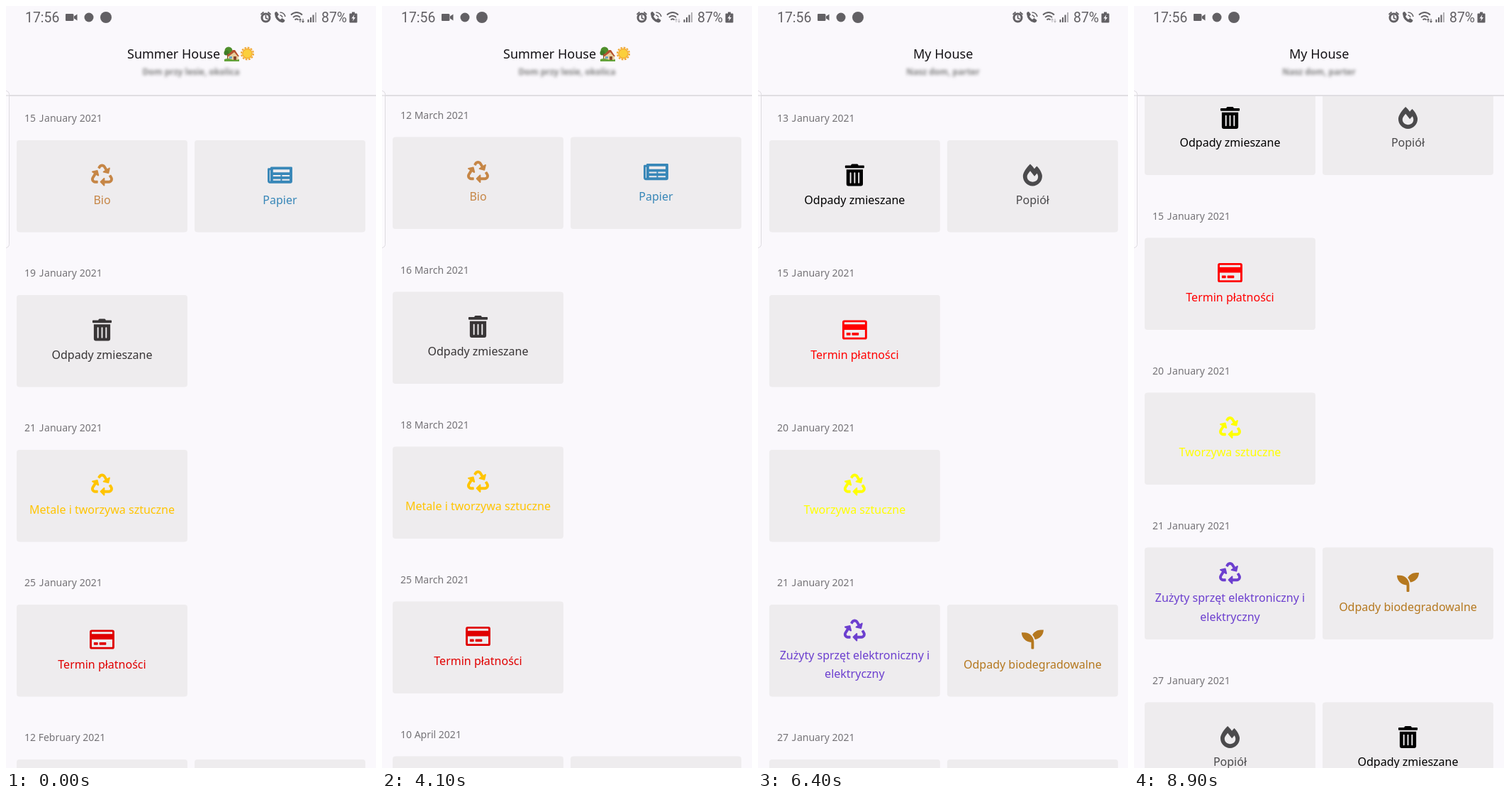
An HTML page that plays this animation: 522 by 1073 pixels, repeating every 9 s.

```html
<!DOCTYPE html>
<html lang="pl">
<head>
<meta charset="utf-8">
<title>Waste calendar</title>
<style>
html, body { margin: 0; width: 100%; height: 100%; overflow: hidden; background: #faf8fc; }
svg { display: block; width: 522px; height: 1073px; font-family: "Noto Sans", sans-serif; }
.date { font-size: 14px; fill: #757377; }
.date tspan { font-family: "Noto Sans Mono", monospace; }
.label { font-size: 16px; text-anchor: middle; }
.title { font-size: 18px; fill: #141215; }
.sub { font-size: 12px; font-weight: 700; fill: #808080; text-anchor: middle; filter: blur(2.3px); }
.status { font: 19.4px Roboto, sans-serif; }
</style>
</head>
<body>
<svg viewBox="0 0 522 1073">
  <g id="home"></g>
  <g id="other"></g>

  <rect width="522" height="125.5" fill="#faf8fc"/>
  <rect y="125" width="522" height="1" fill="#e3e1e5"/>
  <rect y="126" width="522" height="1" fill="#dddbdf"/>
  <rect x="-10" y="119.5" width="14.5" height="221" rx="5" fill="#fff" fill-opacity=".25" stroke="#dddbe0"/>

  <g id="homeTitle">
    <text class="title" x="171" y="73.5">Summer House</text>
    <text class="sub" x="261" y="97">Dom przy lesie, okolica</text>
    <g transform="translate(307 57)">
      <circle cx="7" cy="6" r="5.5" fill="#4f8f2c"/>
      <circle cx="4" cy="9" r="3.5" fill="#3f7d26"/>
      <path d="M6 10v9" stroke="#75502e" stroke-width="2"/>
      <path d="M6 12l8-6 7 7v7H6z" fill="#e9cf9d"/>
      <path d="M5 13l8-8h3l6 9h-2l-5-6-8 6z" fill="#b6522f"/>
      <path d="M14 14h4v6h-4z" fill="#8a4a2c"/>
      <path d="M8 14h4v3H8z" fill="#6fa8c9"/>
      <path d="M1 18q5-2 10 0t11 0v3H1z" fill="#64a33a"/>
    </g>
    <circle cx="340.5" cy="67" r="7.5" fill="#f5b13a"/>
    <circle cx="340.5" cy="67" r="8.500" fill="none" stroke="#f0a834" stroke-width="2" stroke-dasharray="2.7 1.75"/>
    <circle cx="340.5" cy="67" r="5.8" fill="#fbcf3c"/>
  </g>
  <g id="otherTitle">
    <text class="title" x="219" y="73.5">My House</text>
    <text class="sub" x="261" y="97">Nasz dom, parter</text>
  </g>

  <g fill="#626064">
    <text class="status" x="27" y="23">17:56</text>
    <text class="status" x="445" y="23">87%</text>
    <path d="M85 11h9q1.500 0 1.500 1.500v7q0 1.500-1.500 1.500h-9q-1 0-1-1v-8q0-1 1-1zM96 14.500l4.500-3v9l-4.500-3z"/>
    <circle cx="117" cy="16" r="6.500"/>
    <circle cx="141" cy="16" r="8"/>
    <path d="M485.500 10.500h2.500v-2h4v2h2.500q1 0 1 1v11q0 1-1 1h-9q-1 0-1-1v-11q0-1 1-1z"/>
    <path d="M491.500 12l-4 5.500h2.500l-1 4 4-5.500h-2.500z" fill="#faf8fc"/>
    <path d="M379 11q0-3 3-3l3 4-2 2.500q1.500 3 4 4.500l2.500-2 4 3q-.5 3-3.500 3.500-10-2-11-12.500z"/>
  </g>
  <g fill="none" stroke="#626064" stroke-width="2">
    <circle cx="366.500" cy="16.500" r="5.500" stroke-width="3"/>
    <path d="M366.500 13v4l3 1.500M359.500 12l4-3.500M373.500 12l-4-3.500" stroke-width="1.700"/>
    <path d="M386.500 9q6 0 7.500 6M386.500 13q2.500 0 3.500 3" stroke-width="1.500"/>
    <path d="M402 12.500q8-7 16 0M405 16q5-4.500 10 0M407.500 19.500q2.500-2.500 5 0" stroke-width="1.800"/>
    <path d="M426.500 23v-4M430 23v-7M433.500 23v-10.500"/>
    <path d="M437 23v-14" stroke="#b3b1b5"/>
    <path id="arrows" d="M415 23v-5m-1.500 2l1.500-2 1.500 2M419 18v5m-1.500-2l1.500 2 1.500-2" stroke-width="1.100"/>
  </g>
</svg>
<script>
const $ = id => document.getElementById(id);
const PITCH = 218, WIDTH = 522.5, LOOP = 9000, STEP = 100, ICON = 31 / 512;

// Icon: [width, path], drawn on a grid 512 units high
const recycle = [512,
  "M185 262c3 14-12 25-24 17l-41-25-51 81c-13 21 2 49 27 49h52q12 0 12 12v40q0 12-12 12H96c-75 0-121-83-81-147l51-81-41-25c-12-8-9-26 5-29l110-26c9-2 17 3 19 12z" +
  "M283 79l41 66-41 25c-12 8-9 26 5 30l110 25c9 2 17-3 19-12l26-110c3-14-12-25-24-17l-41 25-41-66c-38-60-125-60-163 0l-18 29c-4 6-2 13 4 17l34 21c6 4 13 2 17-4l18-29c13-20 42-19 54 0z" +
  "M497 301l-27-44c-4-6-11-7-17-4l-34 21c-6 4-7 11-4 17l28 44c13 21-2 49-27 49h-96v-48c0-14-17-21-27-11l-80 80c-6 6-6 16 0 22l80 80c10 10 27 3 27-11v-48h96c75 0 121-83 81-147z"];
const slot = x => `M${x} 208a16 16 0 0 1 32 0v224a16 16 0 0 1-32 0z`;
const trash = [448, "M32 464a48 48 0 0 0 48 48h288a48 48 0 0 0 48-48V128H32z" + [112, 208, 304].map(slot).join("") +
  "M432 32H312l-9-19q-7-13-21-13H167q-15 0-22 13l-9 19H16Q0 32 0 48v32q0 16 16 16h416q16 0 16-16V48q0-16-16-16z"];
const card = [576, "M528 32H48Q0 32 0 80v352q0 48 48 48h480q48 0 48-48V80q0-48-48-48zM54 80h468q6 0 6 6v42H48V86q0-6 6-6z" +
  "M522 432H54q-6 0-6-6V256h480v170q0 6-6 6zM108 320h72q12 0 12 12v40q0 12-12 12h-72q-12 0-12-12v-40q0-12 12-12zM236 320h136q12 0 12 12v40q0 12-12 12H236q-12 0-12-12v-40q0-12 12-12z"];
const paper = [576, "M552 64H88q-24 0-24 24v8H24q-24 0-24 24v272q0 56 56 56h472q48 0 48-48V88q0-24-24-24zM56 400q-8 0-8-8V144h16v248q0 8-8 8z" +
  "M128 128h384v64H128zM128 256h176v32H128zM336 256h176v32H336zM128 352h176v32H128zM336 352h176v32H336z"];
const bottle = [512, "M507 73L439 5q-11-10-22 0l-23 22q-10 12 0 23l-77 77c-46-20-102-11-140 27L19 312c-25 25-25 66 0 91l90 90c25 25 66 25 91 0l158-158c38-38 47-94 27-140l77-77q11 10 23 0l22-23q10-11 0-22zM179 423l-90-90 122-122 90 90z"];
const flame = [448, "M324 51c-21 20-40 40-57 60C240 74 206 36 168 0 70 91 0 210 0 282c0 127 100 230 224 230s224-103 224-230c0-54-52-164-124-231zM304 392c-22 15-48 24-77 24-72 0-131-48-131-125 0-39 24-73 73-131l99 125 58-67q6 10 12 20c27 52 15 119-34 154z"];
const sprout = [512, "M64 96H0c0 124 100 224 224 224v144q0 16 16 16h32q16 0 16-16V320C288 196 188 96 64 96zM448 32c-84 0-157 46-196 115 28 30 48 67 59 108C424 243 512 148 512 32z"];

// Kind of waste: [icon, colour, lines of text]
const bio = [recycle, "#c68646", "Bio"];
const papier = [paper, "#3887b8", "Papier"];
const mixed = [trash, "#383536", "Odpady zmieszane"];
const metal = [recycle, "#ffc400", "Metale i tworzywa sztuczne"];
const payment = [card, "#e00000", "Termin płatności"];
const glass = [bottle, "#3cb40a", "Szkło"];
const black = [trash, "#000", "Odpady zmieszane"];
const ash = [flame, "#4b4a4c", "Popiół"];
const due = [card, "#ff0000", "Termin płatności"];
const plastic = [recycle, "#ffff00", "Tworzywa sztuczne"];
const electro = [recycle, "#6c3fcf", "Zużyty sprzęt elektroniczny i", "elektryczny"];
const garden = [sprout, "#b5781f", "Odpady biodegradowalne"];

const homeRows = [
  ["15 January", bio, papier], ["19 January", mixed], ["21 January", metal], ["25 January", payment],
  ["12 February", glass, bio], ["16 February", mixed], ["25 February", payment],
  ["12 March", bio, papier], ["16 March", mixed], ["18 March", metal], ["25 March", payment],
  ["10 April", glass, bio], ["13 April", mixed]
];
const otherRows = [
  ["13 January", black, ash], ["15 January", due], ["20 January", plastic],
  ["21 January", electro, garden], ["27 January", ash, black]
];

function tile([[width, path], colour, ...lines], column) {
  const x = 15 + 251 * column, mid = x + 120.5, lift = 13 * (lines.length - 1);
  const text = lines.map((s, i) => `<text class="label" x="${mid}" y="${278.5 - lift + 26.5 * i}">${s}</text>`).join("");
  return `<rect x="${x}" y="189" width="241" height="129.5" rx="4" fill="#eeecee"/><g fill="${colour}">${text}
    <path fill-rule="evenodd" transform="translate(${mid} ${238 - lift}) scale(${ICON}) translate(${-width / 2} -256)" d="${path}"/></g>`;
}

const list = rows => rows.map(([date, ...kinds], i) => `<g transform="translate(0 ${PITCH * i})">
  <text class="date" x="26" y="163">${date.replace("J", "<tspan>J</tspan>")} 2021</text>${kinds.map(tile).join("")}</g>`).join("");

$("home").innerHTML = list(homeRows);
$("other").innerHTML = list(otherRows);

// Decelerating move from 0 to 1
const ease = (t, start, length, power) =>
  1 - (1 - Math.min(1, Math.max(0, (t - start) / length))) ** power;

function draw(t) {
  const scroll = 490 * ease(t, 2500, 900, 2.71) + 1319.5 * ease(t, 3500, 1300, 2.51);
  const otherScroll = 80.5 * Math.max(0, (t - 8700) / 200) ** 1.5;
  const page = ease(t, 5600, 1000, 3.97) - ease(t, 6600, 1000, 4.85) + ease(t, 7600, 700, 4);
  $("home").setAttribute("transform", `translate(${-WIDTH * page} ${-scroll})`);
  $("other").setAttribute("transform", `translate(${WIDTH * (1 - page)} ${-otherScroll})`);
  $("homeTitle").style.display = page < .5 ? "" : "none";
  $("otherTitle").style.display = page < .5 ? "none" : "";
  const idle = t >= 3800 && t < 4400 || t >= 6000 && t < 8000;
  $("arrows").style.opacity = idle ? .4 : 1;
}

const begin = performance.now();
function tick() {
  const t = (performance.now() - begin) % LOOP;
  draw(Math.floor(t / STEP) * STEP);
  requestAnimationFrame(tick);
}
tick();
</script>
</body>
</html>
```
